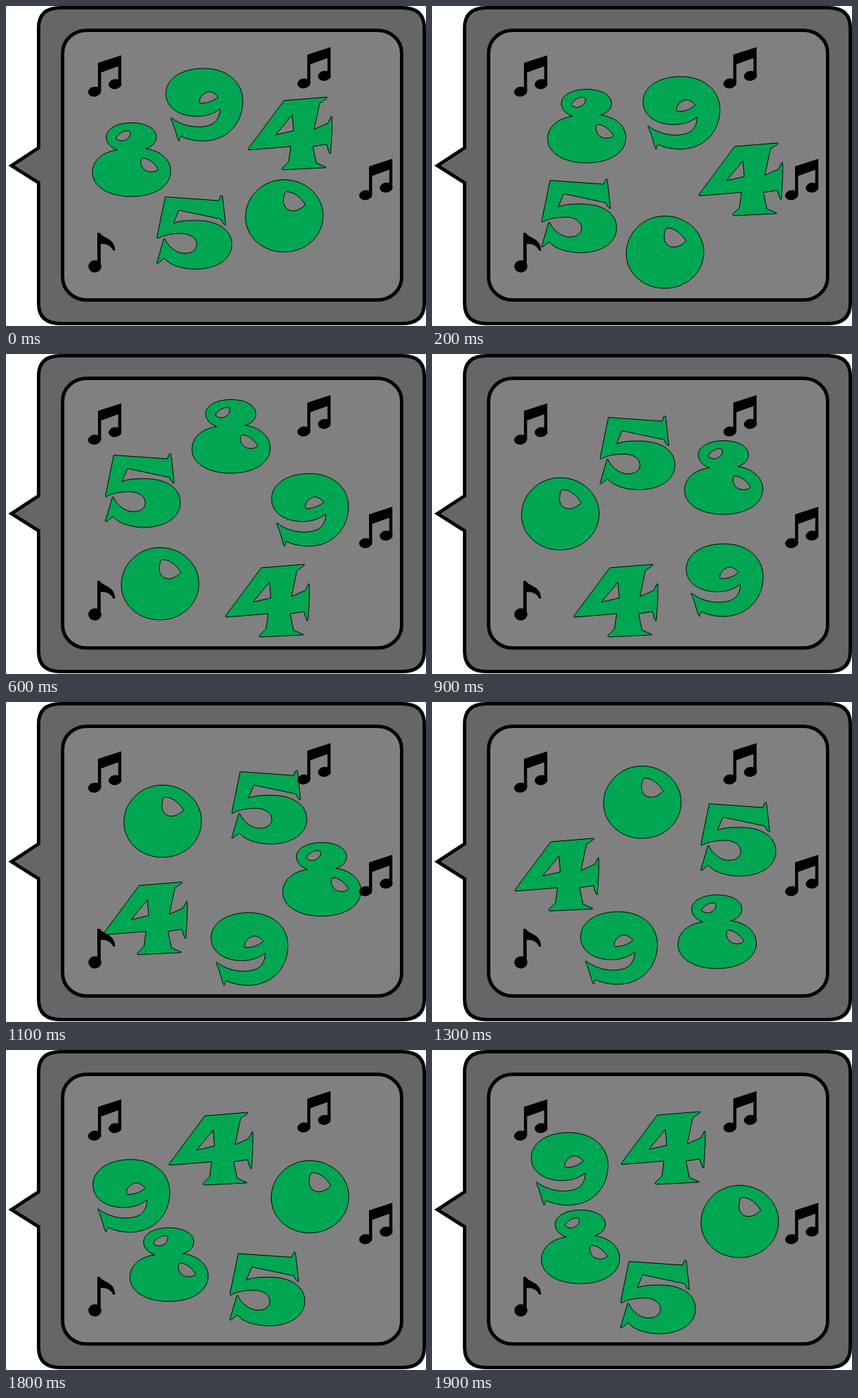
Recreate the animation shown at these times as an HTML page. Size 612 by 467 pixels, loop 2 s.

```html
<!DOCTYPE html>
<html lang="en">
<head>
<meta charset="utf-8">
<title>Circling digits</title>
<style>
  html, body { margin: 0; width: 100%; height: 100%; overflow: hidden; background: #fff; }
  svg { display: block; }
</style>
</head>
<body>
<svg width="612" height="467" viewBox="0 0 612 467">
  <defs>
    <g id="pair">
      <ellipse cx="129" cy="125" rx="9.5" ry="7.2" transform="rotate(-8 129 125)"/>
      <ellipse cx="159" cy="114" rx="9.5" ry="7.2" transform="rotate(-8 159 114)"/>
      <path d="M134 83L168 72V114H163.500V88L138.500 97V125H134Z"/>
    </g>
  </defs>
  <g stroke="#000" stroke-width="5">
    <path fill="#666" d="M80 2.500H577Q609.500 2.500 609.500 32V434Q609.500 463.500 577 463.500H80Q47.500 463.500 47.500 434V258L8 233L47.500 207V32Q47.500 2.500 80 2.500Z"/>
    <rect x="82.500" y="35.500" width="494" height="393.500" rx="35" ry="33" fill="#808080"/>
  </g>
  <g id="digits" fill="#00a651" fill-rule="evenodd" stroke="#000" stroke-linejoin="round"></g>
  <use href="#pair"/>
  <use href="#pair" x="305" y="-12"/>
  <use href="#pair" x="395" y="151"/>
  <ellipse cx="129.500" cy="380" rx="9.500" ry="9"/>
  <path d="M133 331H137C140 339 159 338 159 357H156C153 350 147 347 138 347V380H133Z"/>
</svg>
<script>
const FRAME_MS = 100, FRAMES = 20;
const KEY_FRAMES = [0, 2, 6, 9, 13, 16, 19];
const ORBIT = { x: 320, y: 252, rx: 138, ry: 109, lowest: 361 };

// Each outline is drawn where the digit starts; stops are its centres at KEY_FRAMES.
const digits = [
  { // 9
    outline: `M241 163C258 177 286 180 301 172C309 167 312 158 312 150C303 157 292 161 278 161
      C252 161 233 148 233 128C233 106 256 91 288 91C322 91 345 111 345 139C345 172 321 197 287 197
      C275 197 262 194 255 190C253 192 253 197 252 197C250 197 246 175 240 164Z
      M282 137C284 130 291 125 297 125C303 126 307 130 309 133C303 138 294 142 284 142C282 142 282 140 282 137Z`,
    stops: [[288.5, 144.5], [363, 156.5], [442.5, 228], [426, 330.5], [272, 359.5], [200, 287], [200, 174]]
  },
  { // 4
    outline: `M405 138L467 133Q469 133 467 135L457 142L449 180L469 171L474 161Q475 161 475 163V183
      L473 215Q472 216 471 214L467 202L447 205L452 229L466 235Q467 236 465 236L404 239Q402 239 402 237
      L412 227L415 205L354 210Q352 210 353 208ZM393 188L417 159L419 182Z`,
    stops: [[413.5, 186], [449.5, 253], [380.5, 360], [267.5, 360], [181.5, 252], [230.5, 170], [336.5, 143]]
  },
  { // 0
    outline: `M405 253.500C437 253.500 462 277 462 306C462 336 437 359 405 359C373 359 349 336 349 308
      C349 278 374 253.500 405 253.500ZM409 271C420 271 430 280 436 290C430 296 424 299 417 299
      C408 298 402 290 405 278Q406 271 409 271Z`,
    stops: [[405.5, 306], [339.5, 359], [224.5, 335], [187, 233], [306.5, 146], [385.5, 155], [448.5, 250]]
  },
  { // 5
    outline: `M232 278.500L310 284L313 277Q315 275 315.500 278L320 319Q319 321 317 318L313 311L252 298L244 317
      C255 313 266 313 274 313C306 312 329 325 329 348C329 370 306 384 277 384C255 384 237 377 231 368
      L222 375Q219 377 220 374L230 340Q231 338 232 341C237 352 250 362 262 361C272 361 279 354 278 347
      C277 337 266 332 255 332C240 332 228 335 222 339Q220 340 220 337Z`,
    stops: [[274.5, 330], [214.5, 306], [199.5, 199], [299.5, 144], [446.5, 200], [448.5, 286], [329.5, 360]]
  },
  { // 8
    outline: `M183 170.500C204 170.500 219 179 219 191C219 200 212 206 203 208C225 211 240 224 240 241
      C240 263 216 278 183 278C150 278 126 264 126 243C126 225 141 213 162 210C152 206 146 200 146 191
      C146 179 162 170.500 183 170.500ZM160 193C163 187 170 182 178 182C182 183 182 188 179 192
      C175 196 171 197 168 197C164 196 162 195 160 193ZM199 222C208 222 216 229 222 238
      C219 242 211 243 206 241C199 239 195 230 197 224Z`,
    stops: [[183, 224], [225.5, 175], [328, 120], [425, 180], [415.5, 335], [306, 341], [216.5, 287]]
  }
];

function toOrbit([x, y]) {
  const u = (x - ORBIT.x) / ORBIT.rx, v = (y - ORBIT.y) / ORBIT.ry;
  return { angle: Math.atan2(v, u), radius: Math.hypot(u, v) };
}

const mix = (a, b, k) => a + (b - a) * k;

// Glide clockwise around the orbit between neighbouring stops.
function centreAt(stops, frame) {
  const i = KEY_FRAMES.findLastIndex(key => key <= frame);
  if (KEY_FRAMES[i] === frame) return stops[i];
  const k = (frame - KEY_FRAMES[i]) / (KEY_FRAMES[i + 1] - KEY_FRAMES[i]);
  const from = toOrbit(stops[i]), to = toOrbit(stops[i + 1]);
  if (to.angle < from.angle) to.angle += 2 * Math.PI;
  const angle = mix(from.angle, to.angle, k), radius = mix(from.radius, to.radius, k);
  return [
    ORBIT.x + ORBIT.rx * radius * Math.cos(angle),
    Math.min(ORBIT.lowest, ORBIT.y + ORBIT.ry * radius * Math.sin(angle))
  ];
}

const layer = document.getElementById("digits");
for (const digit of digits) {
  digit.path = document.createElementNS(layer.namespaceURI, "path");
  digit.path.setAttribute("d", digit.outline);
  layer.append(digit.path);
}

function draw(time) {
  const frame = Math.floor(time / FRAME_MS) % FRAMES;
  for (const { path, stops } of digits) {
    const [x, y] = centreAt(stops, frame);
    path.setAttribute("transform", `translate(${x - stops[0][0]} ${y - stops[0][1]})`);
  }
}

const start = performance.now();
function tick() {
  draw(performance.now() - start);
  requestAnimationFrame(tick);
}
tick();
</script>
</body>
</html>
```
